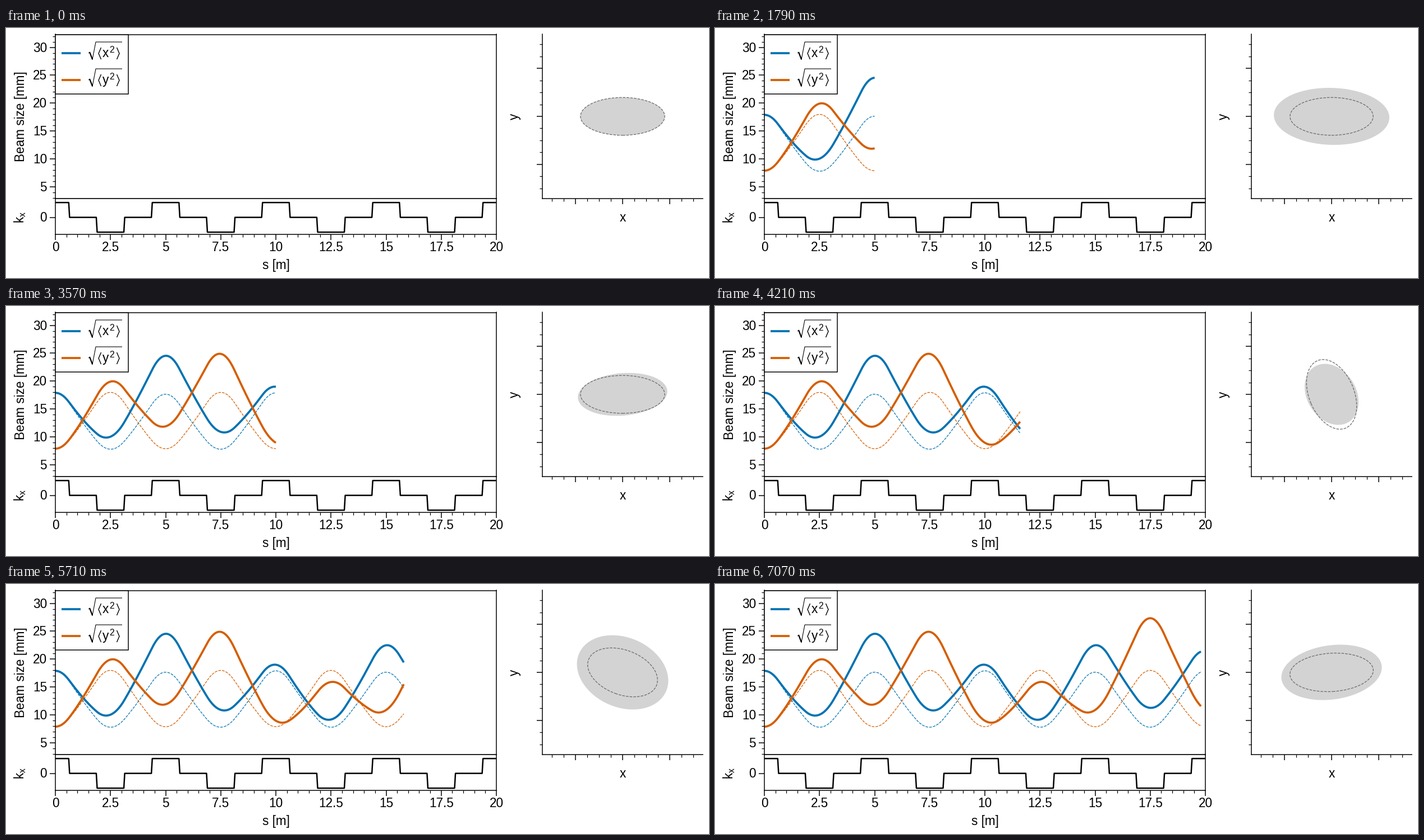
A matplotlib script that plays this animation: 1253 px wide and 447 px high, repeating every 7.14 s.

```python
import numpy as np
import matplotlib.pyplot as plt
from matplotlib.animation import FuncAnimation
from matplotlib.patches import Ellipse, Rectangle
from matplotlib.ticker import MultipleLocator

W, H, DPI = 1253, 447, 128
PX = 72 / DPI  # points per pixel
BLUE, ORANGE = "#0072B2", "#D55E00"
FRAMES, LOOP_MS = 100, 7140
LENGTH, DS = 20.0, 0.025
STEPS = round(LENGTH / DS)
PER_FRAME = 8  # integration steps per frame (0.2 m)

plt.rcParams.update({
    "font.family": "Liberation Sans",
    "font.size": 22.5 * PX,
    "mathtext.fontset": "custom",
    "mathtext.rm": "Liberation Sans",
    "axes.linewidth": 1.5 * PX,
})


# ---- beam physics -------------------------------------------------------

def focus(s):
    """Sign of the quadrupole gradient in a 5 m FODO cell."""
    m = abs((s + 2.5) % 5 - 2.5)
    return 1.0 * (m < 0.625) - 1.0 * (m > 1.875)


def track(params):
    """Leapfrog the two edge vectors of a tilted uniform ellipse.

    Returns an array indexed by step, plane, vector and parameter set.
    """
    k, perveance, x0, y0, ex, ey = params
    zero = 0 * x0
    x, vx = np.array([x0, zero]), np.array([zero, -ex / x0])
    y, vy = np.array([zero, -y0]), np.array([-ey / y0, zero])
    path = [(x, y)]
    for s in (np.arange(STEPS) + 0.5) * DS:
        x, y = x + vx * DS / 2, y + vy * DS / 2
        xx, yy, xy = (x * x).sum(0), (y * y).sum(0), (x * y).sum(0)
        d = abs(x[0] * y[1] - x[1] * y[0])
        f = 2 * perveance / (d * (xx + yy + 2 * d))
        g = k * focus(s)
        vx = vx + DS * (f * ((yy + d) * x - xy * y) - g * x)
        vy = vy + DS * (f * ((xx + d) * y - xy * x) + g * y)
        x, y = x + vx * DS / 2, y + vy * DS / 2
        path.append((x, y))
    return np.array(path)


def envelope(path):
    return np.sqrt((path ** 2).sum(2))


# Beam sizes (s, mm) by case (0 with, 1 without space charge) and plane
READINGS = {
    (0, 0): [(0, 17.9), (2.3, 9.88), (2.6, 10.2), (5, 24.55), (7.2, 11.7),
             (7.675, 10.8), (10, 19.0), (12.4, 9.15), (13.4, 13.05),
             (15.05, 22.5), (16, 18.1), (17.55, 11.25), (19.8, 21.35)],
    (0, 1): [(0, 7.9), (2.6, 20.0), (4.875, 11.83), (7.2, 24.5),
             (7.45, 24.9), (10, 9.0), (10.3, 8.63), (12.575, 15.9),
             (13.4, 13.7), (14.65, 10.43), (16, 17.15), (17.5, 27.33),
             (19.8, 11.5)],
    (1, 0): [(0, 17.9), (2.5, 7.8), (5, 17.65), (7.2, 8.2), (10, 17.9),
             (13.4, 10.5), (15, 17.65), (16, 13.75)],
    (1, 1): [(0, 7.9), (2.5, 18.0), (5, 7.88), (7.2, 17.5), (10, 7.9),
             (13.4, 14.5), (16, 11.25), (17.5, 18.0)],
}


def without_charge(params):
    free = params.copy()
    free[1] = 0
    return free


def residuals(params):
    n = params.shape[1]
    sizes = envelope(track(np.hstack([params, without_charge(params)])))
    return np.array([
        sizes[round(s / DS), plane, case * n:(case + 1) * n] - size
        for (case, plane), points in READINGS.items() for s, size in points])


def best(trials):
    return trials[:, np.nanargmin((residuals(trials) ** 2).sum(0))]


def fit(guess):
    """Scan the perveance, then refine everything with damped least squares."""
    trials = np.repeat(guess[:, None], 41, axis=1)
    trials[1] = np.linspace(5, 13, 41)
    p, eps = best(trials), 1e-5
    for _ in range(9):
        r = residuals(p[:, None] * (1 + eps * np.eye(6, 7, 1)))
        jac = (r[:, 1:] - r[:, :1]) / eps
        normal, grad = jac.T @ jac, jac.T @ r[:, 0]
        steps = [np.zeros(6)] + [
            np.linalg.solve(normal + damp * np.diag(np.diag(normal)), -grad)
            for damp in 10.0 ** np.arange(-4, 4)]
        p = best(p[:, None] * (1 + np.array(steps).T))
    return p


# gradient, perveance, initial radii and emittances
beam = fit(np.array([0.5552, 8.5, 17.9, 7.88, 39.6, 40.2]))[:, None]
paths = [track(p)[..., 0] for p in (beam, without_charge(beam))]
sizes = [envelope(p) for p in paths]
position = np.arange(STEPS + 1) * DS


# ---- figure -------------------------------------------------------------

fig = plt.figure(figsize=(W / DPI, H / DPI), dpi=DPI, facecolor="white")


def axes(left, top, right, bottom, xlim, ylim):
    ax = fig.add_axes([left / W, 1 - bottom / H,
                       (right - left) / W, (bottom - top) / H])
    ax.set(xlim=xlim, ylim=ylim)
    ax.tick_params(length=10 * PX, width=1.5 * PX,
                   labelbottom=False, labelleft=False)
    ax.tick_params(which="minor", length=5 * PX, width=1.2 * PX)
    return ax


def ticks(axis, major, minor):
    axis.set_major_locator(MultipleLocator(major))
    axis.set_minor_locator(MultipleLocator(minor))


def label(x, y, text, ha="center", rotation=0, **style):
    return fig.text(x / W, 1 - y / H, text, ha=ha, va="baseline",
                    rotation=rotation, rotation_mode="anchor", **style)


size_ax = axes(88, 11.5, 874, 304.5, (0, LENGTH), (2.945, 32.31))
ticks(size_ax.xaxis, 2.5, 0.5)
ticks(size_ax.yaxis, 5, 1)
size_ax.tick_params(axis="x", which="major", length=0)

k_ax = axes(88, 304.5, 874, 368.5, (0, LENGTH), (-1.13, 1.287))
ticks(k_ax.xaxis, 2.5, 0.5)
k_ax.set_yticks([0])
edges = np.sort(np.concatenate(
    [c + np.array([0.625, 1.875, 3.125, 4.375]) for c in range(0, 20, 5)]))
corners = np.concatenate([[0], np.ravel([edges - 0.02, edges + 0.02], "F"), [20]])
k_ax.plot(corners, focus(corners), color="black", lw=2.5 * PX)

beam_ax = axes(956, 11.5, 1242, 304.5, (-34.1, 34.1), (-34.2, 34.2))
ticks(beam_ax.xaxis, 20, 5)
ticks(beam_ax.yaxis, 20, 5)
beam_ax.spines[["top", "right"]].set_visible(False)

for v in range(5, 31, 5):
    label(73, 292 - (v - 5) * 9.976, str(v), ha="right")
label(73, 346.5, "0", ha="right")
for v in np.arange(0, 20.1, 2.5):
    label(88 + v * 39.3, 399, f"{v:g}")
label(481, 430.5, "s [m]")
label(33, 158.5, "Beam size [mm]", rotation=90)
label(32, 338, r"$\mathrm{k_x}$", rotation=90)
label(1099, 345.5, "x")
label(912.5, 158, "y", rotation=90)

# ---- legend -------------------------------------------------------------

legend = fig.add_axes([0, 0, 1, 1], zorder=5)
legend.set(xlim=(0, W), ylim=(H, 0))
legend.axis("off")
legend.add_patch(Rectangle((88, 11.5), 129.5, 106, facecolor="white",
                           edgecolor="black", lw=1.5 * PX))


def stroke(points, width, color="black"):
    legend.plot(*zip(*points), color=color, lw=width * PX,
                solid_capstyle="butt", solid_joinstyle="miter")


def legend_row(y, color, name):
    stroke([(99, y), (132.5, y)], 3.75, color)
    stroke([(147, y + 0.5), (149.5, y - 1.5)], 1)
    stroke([(149, y - 1.5), (154, y + 11.5)], 2.2)
    stroke([(153.8, y + 12.5), (160, y - 19.5), (207, y - 19.5)], 1.1)
    stroke([(169.5, y - 9.5), (165, y + 1), (169.5, y + 11.5)], 1.4)
    stroke([(197.5, y - 9.5), (202, y + 1), (197.5, y + 11.5)], 1.4)
    legend.text(171.5, y + 7.5, name, va="baseline")
    legend.text(184, y - 0.5, "2", va="baseline", size=15.75 * PX)


legend_row(44.5, BLUE, "x")
legend_row(92.5, ORANGE, "y")

# ---- moving parts -------------------------------------------------------


def curve(color, **style):
    return size_ax.plot([], [], color=color, solid_capstyle="butt", **style)[0]


thin = dict(lw=1.25 * PX, ls="--")
thick = dict(lw=3.75 * PX, solid_joinstyle="round")
free_lines = [curve(c, **thin) for c in (BLUE, ORANGE)]
beam_lines = [curve(c, **thick) for c in (BLUE, ORANGE)]
lines = [beam_lines, free_lines]

ellipses = [
    Ellipse((0, 0), 1, 1, facecolor="lightgray", edgecolor="none"),
    Ellipse((0, 0), 1, 1, fill=False, edgecolor="dimgray", **thin),
]
for e in ellipses:
    beam_ax.add_patch(e)


def shape(ellipse, x, y):
    xx, yy, xy = x @ x, y @ y, x @ y
    spread = np.hypot(xx - yy, 2 * xy)
    ellipse.width = 2 * np.sqrt((xx + yy + spread) / 2)
    ellipse.height = 2 * np.sqrt((xx + yy - spread) / 2)
    ellipse.angle = np.degrees(0.5 * np.arctan2(2 * xy, xx - yy))


def update(frame):
    step = frame * PER_FRAME
    for case in (0, 1):
        shape(ellipses[case], *paths[case][step])
        for plane, line in enumerate(lines[case]):
            line.set_data(position[:step + 1], sizes[case][:step + 1, plane])
    return ellipses + beam_lines + free_lines


anim = FuncAnimation(fig, update, frames=FRAMES, interval=LOOP_MS / FRAMES,
                     repeat=True, repeat_delay=0, blit=False)
plt.show()
```
